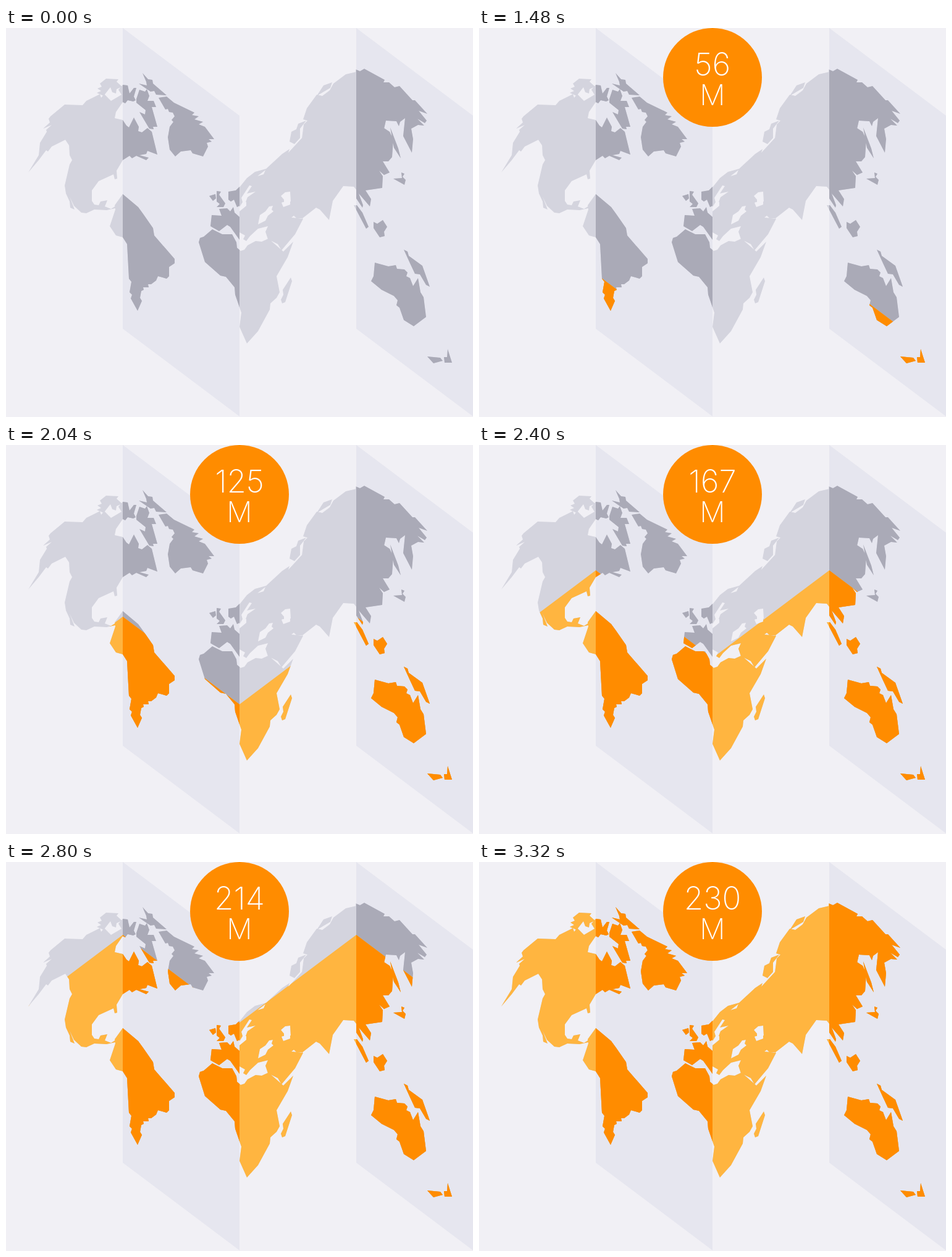
Animation, 756 px wide and 630 px high, one loop 3.48 s. Source, as an HTML page:

```html
<!DOCTYPE html>
<html lang="en">
<head>
<meta charset="utf-8">
<title>World map</title>
<style>
html, body { margin: 0; width: 100%; height: 100%; overflow: hidden; background: #f1f0f5; }
svg { display: block; width: 100%; height: 100%; }
text { font-family: Inter, "Open Sans", sans-serif; font-weight: 200; fill: #fff; text-anchor: middle; }
</style>
</head>
<body>
<svg viewBox="0 0 756 630">
<defs>
<clipPath id="land">
  <!-- Alaska and western Canada -->
  <path d="M36 234 53 206 55 186 66 168 65 165 74 157 60 163 71 153 69 147 72 143 95 124 124 125 130 118 152 107 154 113 159 107 170 118 187 108 182 100 189 92V120L178 136 176 146 189 149V190H102L96 181 74 192 68 200 65 198 53 214Z"/>
  <!-- United States and Mexico -->
  <path d="M102 189H189V214L179 231 180 244 176 245 174 237 150 248 139 263 139 280 143 286 150 287 153 281 164 279 160 289 170 293 178 288 177 292 163 295 143 294 130 300 122 299 110 288 103 273 111 294 104 291 103 281 97 268 95 255 103 221 107 214 103 206Z"/>
  <path d="M148 98 155 95 152 90 162 82 182 83 179 87 188 95 179 99 178 106 172 104 169 96 158 110 147 105 154 102Z"/>
  <!-- Eastern Canada -->
  <path d="M189 149 195 158 199 161 207 145 215 160 214 167 220 169 229 162 236 168 245 205 229 199 227 204 216 206 231 210 227 214 211 207 204 211 200 207 189 214Z"/>
  <path d="M189 92 197 93 200 106 207 97 211 97 207 111 210 117 206 119 197 117 193 122 189 120Z"/>
  <path d="M211 115 216 100 225 103 228 99 232 110 229 118 239 118 243 128 236 128 245 160 238 160 239 164 232 163 216 136 225 140 226 133 211 121Z"/>
  <path d="M221 73 230 83 237 84 238 90 260 109 243 108 240 102 234 103 215 90 228 93 227 87Z"/>
  <!-- Greenland -->
  <path d="M247 113 260 111 272 121 305 137 301 141 312 143 305 148 319 152 312 156 322 160 337 180 328 180 333 184 325 186 327 192 319 208 302 203 299 198 283 200 274 208 265 197 262 177 265 160 271 152 268 149 273 143 270 137 264 136 262 131 258 132Z"/>
  <!-- South America -->
  <path d="M189 269 176 287 177 294 168 321 178 336 189 339 196 350 199 406 203 411 200 428 204 432 202 438 213 458 220 442 217 437 219 426 223 424 222 420 231 420 230 415 235 415 243 409 246 402 260 406 264 402 264 387 273 381 273 374 240 336 238 324 222 301 214 290Z"/>
  <!-- British Isles -->
  <path d="M329 272 339 269 340 276 335 280ZM341 264 348 265 345 270 355 284 352 290 341 290 346 285 341 281Z"/>
  <!-- Europe, west -->
  <path d="M378 257 372 263 360 265 360 278 364 281 369 278 374 290 378 288ZM378 306 370 299 368 290 363 297 358 292 345 293 349 304 333 303 331 321 345 329 358 319 363 322 378 343Z"/>
  <!-- Northern Europe -->
  <path clip-rule="evenodd" d="M378 258 390 243 403 233 421 228 447 204 459 196 457 202 480 177V282H461L460 265 452 266 445 272 450 278V282H388L391 274 404 265 390 268 398 256 394 255 381 275 383 282 378 290ZM407 240 420 230 417 237Z"/>
  <!-- Southern Europe and the Near East -->
  <path d="M389 281H450L446 283 449 290 460 286V281H480V308L470 308 466 304 462 307 481 309 468 334 446 360 440 350 424 342 420 330 424 321 408 325 395 337 389 345 384 342 387 336 378 331V297L389 288ZM408 318 420 312 424 304 433 297 430 294 432 288 426 289 420 297 411 303Z" clip-rule="evenodd"/>
  <!-- Asia, middle -->
  <path d="M479 179 482 156 488 150 481 148 487 130 503 108 512 110 524 101 530 90 550 75 567 71V262L563 257 546 256 529 280 523 311 508 294 502 291 479 309Z"/>
  <path d="M503 110 514 93 528 88 525 97ZM459 184 462 168 470 164 473 155 486 150 476 163 476 178 467 188Z"/>
  <!-- Siberia, east -->
  <path d="M566 67 573 70 580 66 613 84 611 88 620 88 629 96 637 94 658 117 662 117 682 139 668 134 681 150 678 154 666 147 677 158 667 157 656 163 659 180 657 202 643 175 646 146 638 152 636 159 632 151 615 150 612 163H567Z"/>
  <!-- China and Indochina -->
  <path d="M567 162H612L621 168 627 180 625 209 619 216 610 216 621 234 612 238 604 231 610 240 609 259 582 263 591 277 589 289 571 268 578 287 577 291 567 276Z"/>
  <path d="M622 161 635 195 639 211 628 194ZM640 234 645 236 642 241 647 246 645 254 627 244 641 243Z"/>
  <!-- Africa -->
  <path d="M312 347 314 340 320 338 334 326 350 334 366 334 373 347 374 356 380 361 386 359 391 352 404 345 414 346 425 341 449 362 465 346 456 371 438 402 443 428 438 437 428 446 427 456 408 491 390 511 378 484 381 461 371 432 370 420 356 403 347 401 322 379Z"/>
  <path d="M461 404 463 410 452 444 447 446 445 440 449 432 448 424Z"/>
  <!-- Southeast Asia -->
  <path d="M563 287 568 287 577 299 587 322 583 325ZM595 314 601 317 610 311 617 322 612 330 613 337 605 339 595 324ZM644 359 650 362 652 369 674 385 686 419 680 416 670 399 662 398 654 381Z"/>
  <!-- Australia and New Zealand -->
  <path d="M597 380 619 386 631 384 633 390 645 391 650 396 648 402 654 405 659 418 667 405 671 428 676 436 680 468 660 483 644 473 637 453 632 449 634 441 628 434 608 424 591 410 595 402Z"/>
  <path d="M682 532 703 534 707 539 692 543ZM715 520 722 542 710 542 709 533 714 533Z"/>
</clipPath>
<path id="panels" d="M189 0 378 142V629L189 487ZM567 0 756 142V629L567 487Z"/>
</defs>
<rect width="756" height="630" fill="#f1f0f5"/>
<use href="#panels" fill="#e6e6ef"/>
<g clip-path="url(#land)">
  <rect width="756" height="630" fill="#d4d4de"/>
  <path d="M189 0H378V630H189ZM567 0H756V630H567Z" fill="#aaaab7"/>
  <g id="fill">
    <path d="M0 142 189 0 378 142 567 0 756 142V700H0Z" fill="#ffb540"/>
    <path d="M189 0 378 142V700H189ZM567 0 756 142V700H567Z" fill="#ff8c00"/>
  </g>
</g>
<g id="badge">
  <circle id="disc" cx="378" cy="80" r="80" fill="#ff8c00"/>
  <text id="count" x="378" y="76.5" font-size="51"></text>
  <text x="378" y="125" font-size="46">M</text>
</g>
</svg>
<script>
const LOOP = 3480, STEP = 40, START = 1040;
const levelKeys = [[1040, 492], [1480, 398], [2040, 278], [2400, 203], [2800, 118], [3240, 49], [3320, 34]];
const countKeys = [[1040, 1], [1480, 56], [2040, 125], [2400, 167], [2800, 214], [2960, 230]];
const el = id => document.getElementById(id);
const fill = el("fill"), badge = el("badge"), disc = el("disc"), count = el("count");

function at(keys, t) {
  let i = 1;
  while (i < keys.length - 1 && t > keys[i][0]) i++;
  const [t0, a] = keys[i - 1], [t1, b] = keys[i];
  const p = Math.min(1, Math.max(0, (t - t0) / (t1 - t0)));
  return a + (b - a) * p;
}

function draw(ms) {
  const t = Math.floor((ms % LOOP) / STEP) * STEP;
  const show = t >= START ? "visible" : "hidden";
  fill.setAttribute("visibility", show);
  badge.setAttribute("visibility", show);
  fill.setAttribute("transform", `translate(0 ${at(levelKeys, t)})`);
  const pop = Math.min(1, Math.max(0, (t - START + STEP) / 120));
  disc.setAttribute("r", 48.5 + 31.5 * pop);
  disc.setAttribute("fill-opacity", pop);
  count.textContent = Math.round(at(countKeys, t));
}

const begin = performance.now();
function tick() {
  draw(performance.now() - begin);
  requestAnimationFrame(tick);
}
tick();
</script>
</body>
</html>
```
